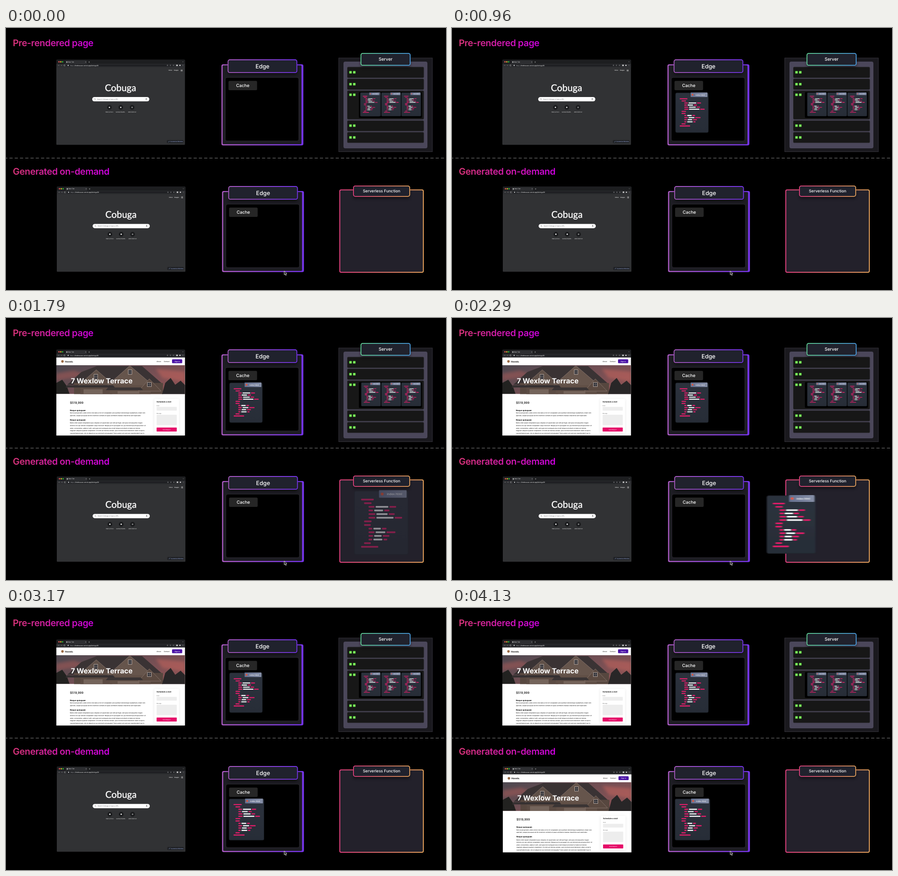
Recreate the animation shown at these times as an HTML page. Size 970x577 px, loop 4.18 s.

```html
<!DOCTYPE html>
<html lang="en">
<head>
<meta charset="utf-8">
<title>Pre-rendered and on-demand pages</title>
<style>
  html, body { margin: 0; width: 100%; height: 100%; overflow: hidden; background: #000; }
  svg { display: block; width: 970px; height: 577px; }
  text { font-family: Inter, Roboto, sans-serif; text-rendering: geometricPrecision; white-space: pre; }
  .logo { font-family: Lato, sans-serif; }
  .title { letter-spacing: -0.4px; }
</style>
</head>
<body>
<svg id="stage" viewBox="0 0 970 577"></svg>
<script>
const LOOP = 4180;
const stage = document.getElementById('stage');

const rect = (x, y, w, h, fill, rx = 0, more = '') =>
  `<rect x="${x}" y="${y}" width="${w}" height="${h}" fill="${fill}" rx="${rx}" ${more}/>`;
const circle = (x, y, r, fill, more = '') =>
  `<circle cx="${x}" cy="${y}" r="${r}" fill="${fill}" ${more}/>`;
const poly = (points, fill, more = '') => `<polygon points="${points}" fill="${fill}" ${more}/>`;
const path = (d, stroke, width = 0.6) =>
  `<path d="${d}" fill="none" stroke="${stroke}" stroke-width="${width}"/>`;
const text = (x, y, words, size, fill = '#fff', weight = 400, more = '') =>
  `<text x="${x}" y="${y}" font-size="${size}" fill="${fill}" font-weight="${weight}" ${more}>${words}</text>`;
const MID = 'text-anchor="middle"';
const shift = (x, y, content) => `<g transform="translate(${x} ${y})">${content}</g>`;

const gradient = (id, from, to, more = '') =>
  `<linearGradient id="${id}" ${more}><stop stop-color="${from}"/><stop offset="1" stop-color="${to}"/></linearGradient>`;

const defs = `<defs>
  ${gradient('title', '#d83478', '#c800dc')}
  ${gradient('purple', '#ac5bc4', '#7634ec')}
  ${gradient('mint', '#62d69a', '#4a9fe2')}
  ${gradient('sunset', '#e2417e', '#e6a25c')}
  ${gradient('sky', '#4d4850', '#8f5456', 'x2="1" y2="0.7"')}
  ${gradient('panel', '#2c323d', '#272d37', 'x2="0" y2="1"')}
  ${gradient('label', '#66708f', '#8790a8')}
  <filter id="soft" x="-20%" y="-20%" width="140%" height="150%"><feGaussianBlur stdDeviation="3"/></filter>
  <filter id="motion" x="-20%" y="-20%" width="140%" height="140%"><feGaussianBlur id="blur" stdDeviation="0 0"/></filter>
  <clipPath id="hero"><rect x="111" y="104" width="283.5" height="63.5"/></clipPath>
</defs>`;

// Each row: indent, then widths of a pink, a white and a pink bar
const CODE = [
  [9, 17], [13, 10], [19, 8, 17, 9], [19, 6, 12, 7], [19, 9, 15, 8], [19, 9, 23, 10], [13, 10],
  [13, 9], [19, 5, 10, 6], [19, 8, 13, 12], [19, 6, 10, 9], [19, 5, 12, 5], [13, 9], [9, 23]
];

function fileCard(height, firstRow, pitch) {
  const bars = CODE.map(([indent, ...widths], row) => {
    let x = indent;
    return widths.map((w, i) => {
      const bar = rect(x, firstRow + row * pitch - 1.2, w, 2.3, i === 1 ? '#f4f4f6' : '#e01e69', 0.9);
      x += w + 1.5;
      return bar;
    }).join('');
  }).join('');
  return rect(0, 0, 72, height, 'url(#panel)', 2.5, 'stroke="#20262e" stroke-width="1"') + bars +
    rect(33, -1, 37, 10, 'url(#label)', 0.8) + circle(37.3, 4, 1.9, '#e8583a') +
    text(43.5, 5.5, 'index.html', 4.1, '#fff', 500);
}

function browser() {
  const arrows = path('M118 82.3h-3m1.2-1.2-1.2 1.2 1.2 1.2M120.5 82.3h3m-1.2-1.2 1.2 1.2-1.2 1.2', '#85878b', 0.5);
  const icons = [356, 362.5, 369].map(x => circle(x, 82.3, 1, 'none', 'stroke="#b8babd" stroke-width=".5"')).join('');
  const shortcuts = [[228, 'Next.js Docs'], [253, 'Lumvex Dashb...'], [278, 'Add shortcut']].map(([x, name], i) =>
    circle(x, 174.8, 5.2, '#1b1c1e') +
    (i < 2 ? circle(x, 174.8, 1.4, '#fff') : path(`M${x - 1.7} 174.8h3.4m-1.7-1.7v3.4`, '#fff', 0.6)) +
    text(x, 186, name, 2.8, '#f1f1f1', 500, MID)).join('');
  const grid = [0, 1, 2].map(r => [0, 1, 2].map(c =>
    rect(385.4 + c * 1.3, 91.9 + r * 1.3, 0.9, 0.9, '#e4e4e4')).join('')).join('');
  return rect(111, 69.8, 283.5, 187.5, '#313234', 1.5) +
    rect(111, 69.8, 283.5, 10, '#1d1e20', 1.5) +
    rect(111, 79, 283.5, 8, '#2d2e31') +
    rect(131, 71.3, 47, 8, '#2d2e31', 1.5) +
    ['#ee5f57', '#f4bd30', '#2dc840'].map((c, i) => circle(116.8 + i * 4, 74.6, 1.5, c)).join('') +
    circle(134.2, 75, 1.3, '#d6d6d6') + text(137, 76.1, 'New Tab', 3.1, '#f2f2f2') +
    path('M174.8 74l1.8 1.8m0-1.8-1.8 1.8M181.8 75h3m-1.5-1.5v3M389 74l1 1 1-1', '#c8c9cb', 0.5) +
    arrows + path('M130.2 81.6a1.4 1.4 0 1 0 .1 1.3', '#d8d8d8', 0.6) +
    rect(133, 80.2, 239, 4.6, '#1f2023', 2.3) + circle(137, 82.4, 1.3, '#c6c8ca') +
    text(141, 83.6, '<tspan fill="#a5a7aa">https://</tspan>findhouses.vercel.app/listings/81', 3.25, '#fff', 500) +
    icons + rect(375.5, 80.8, 3, 3, '#ddd') + circle(383.5, 82.3, 1.3, '#f5f5f5') +
    circle(390, 81, 0.4, '#ccc') + circle(390, 82.3, 0.4, '#ccc') + circle(390, 83.6, 0.4, '#ccc') +
    text(358.5, 94.4, 'Inbox', 3, '#fff', 500) + text(370, 94.4, 'Images', 3, '#fff', 500) + grid +
    text(252.5, 138.6, 'Cobuga', 20.5, '#fff', 400, MID + ' class="logo" stroke="#fff" stroke-width=".4"') +
    rect(190, 152, 126, 9.6, '#fff', 4.8) +
    circle(196, 156.3, 1.2, 'none', 'stroke="#777" stroke-width=".5"') + path('M196.9 157.2l1.2 1.2', '#777', 0.5) +
    text(201, 158, 'Search Cobuga or type a URL', 3.3, '#5f6165') +
    rect(308.4, 154.4, 1.6, 3, '#666', 0.8) + path('M307.6 156.5q0 2 1.6 2t1.6-2m-1.6 2v1', '#666', 0.4) +
    shortcuts + rect(354.5, 246.8, 36.5, 6.8, '#202226', 1.5) +
    path('M358 251.6l2.6-2.6', '#9fb9ee', 0.7) + text(362.2, 251.4, 'Customize Window', 3, '#9fb0e8', 500);
}

function house() {
  const trim = 'stroke="#8d7a71" stroke-width=".8"';
  const pane = (x, y, w, h) => rect(x, y, w, h, '#33343a', 0, 'stroke="#b9aaa2" stroke-width="1"') +
    path(`M${x + w / 2} ${y}v${h}M${x} ${y + h / 2}h${w}`, '#a89a93', 0.4);
  return `<g clip-path="url(#hero)">` + rect(111, 104, 283.5, 63.5, 'url(#sky)') +
    `<g filter="url(#soft)" opacity=".6">` +
    poly('111,122 150,116 180,126 111,138', '#9c5654') + poly('330,112 395,118 395,140 345,132', '#bd625c') + '</g>' +
    poly('111,167 111,143 124,136 134,150 140,167', '#222220') +
    poly('135,147 166,119 200,106 300,106 347,147', '#3a3334') +
    rect(150, 143, 196, 25, '#57473f') +
    poly('160,148 199,114 238,148', '#5f5048', trim) + rect(164, 146, 70, 22, '#5b4b43') +
    poly('222,150 273,105 326,150', '#66554c', trim) + rect(229, 148, 90, 20, '#604f46') +
    poly('292,161 316,134 342,161', '#5a4940', trim) +
    poly('135,148 236,148 240,153 131,153', '#353031') +
    poly('225,153 297,153 302,159 220,159', '#3a3434') +
    pane(269.5, 114, 8, 10) + pane(194, 124, 8, 11) + pane(311.5, 142, 9, 9) +
    rect(171, 157, 42, 11, '#74645b') + rect(246, 161, 48, 7, '#74635a') +
    poly('344,168 351,143 363,132 373,147 385,138 395,148 395,168', '#282627') + '</g>';
}

const PARAGRAPHS = [
  [204.5, 210.2, [
    'Sed ut perspiciatis unde omnis iste natus error sit voluptatem accusantium doloremque laudantium, totam rem',
    'aperiam, eaque ipsa quae ab illo inventore veritatis et quasi architecto beatae vitae dicta sunt explicabo.']],
  [226, 232.4, [
    'Nemo enim ipsam voluptatem quia voluptas sit aspernatur aut odit aut fugit, sed quia consequuntur magni',
    'dolores eos qui ratione voluptatem sequi nesciunt. Neque porro quisquam est, qui dolorem ipsum quia dolor sit',
    'amet, consectetur, adipisci velit, sed quia non numquam eius modi tempora incidunt ut labore et dolore',
    'magnam aliquam quaerat voluptatem. Ut enim ad minima veniam, quis nostrum exercitationem ullam corporis',
    'suscipit laboriosam, nisi ut aliquid ex ea commodi consequatur? Quis autem vel eum iure reprehenderit qui in']]
];

function listing() {
  const copy = PARAGRAPHS.map(([headY, firstY, lines]) =>
    text(141, headY, 'Neque quisquam', 4.2, '#000', 700) +
    lines.map((line, i) => text(141, firstY + i * 5.55, line, 3.17, '#111', 500)).join('')).join('');
  return rect(111, 87, 283.5, 171.8, '#fff') +
    circle(124.5, 95.6, 2.8, '#9a6b45') + text(130, 97.6, 'Hovels.', 5.1, '#111', 700) +
    text(332, 96.6, 'About', 3.4, '#222', 500) + text(347.8, 96.6, 'Contact', 3.4, '#222', 500) +
    rect(366, 91, 22.5, 8.6, '#4b14a6', 1.6) + text(377.2, 96.6, 'Sign in', 3.4, '#fff', 500, MID) +
    house() + text(143, 144.3, '7 Wexlow Terrace', 15.7, '#fff', 700) +
    text(141, 188.8, '$519,999', 6.7, '#111', 500) + copy +
    rect(327, 179, 54.5, 75, '#bbb', 2, 'opacity=".35" filter="url(#soft)"') +
    rect(327, 178, 54.5, 75.5, '#fff', 2) + text(332, 186, 'Schedule a visit', 4.2, '#111', 700) +
    text(332, 194, 'Email', 2.4, '#444') + rect(332, 195.8, 44.5, 8.2, '#ededed', 0.8) +
    text(332, 211, 'Message', 2.4, '#444') + rect(332, 213, 44.5, 23, '#ededed', 0.8) +
    rect(332, 241.3, 44.5, 8.8, '#e50b67', 1) + text(354.2, 246.6, 'Send Request', 2.6, '#fff', 500, MID);
}

const header = (x, y, w, h, paint, title, size) =>
  rect(x, y + 5, w, h, '#000', 4, 'opacity=".45" filter="url(#soft)"') +
  rect(x, y, w, h, '#20222d', 4, `stroke="url(#${paint})" stroke-width="1.8"`) +
  text(x + w / 2, y + h / 2 + size * 0.35, title, size, '#fff', 500, MID);

const edge = () =>
  rect(475, 80, 180.5, 178.5, 'url(#purple)', 3.5) + rect(477.5, 82.3, 173.9, 173.7, '#1e1d24', 2) +
  rect(483.5, 109, 162, 139.8, '#000', 4, 'stroke="#2b2a30" stroke-width="1"') +
  header(489.5, 70, 151.8, 28.2, 'purple', 'Edge', 12.7) +
  rect(490.5, 116.5, 63, 20.4, '#262626', 2.5) + text(522, 130.1, 'Cache', 9.6, '#fff', 500, MID);

const SMALL = 0.592;
const topCard = fileCard(87, 13, 4.6);
const bottomCard = fileCard(85, 11.5, 4.87);

function server() {
  const bays = [[86, 23.5, 97.5], [112, 23.5, 123.7], [138, 63, 147], [204, 23, 215], [229.7, 23, 241]];
  const led = (x, y) => rect(x - 2.8, y - 2.8, 5.6, 5.6, '#68e648', 0.8) + rect(x - 0.8, y - 1, 1.6, 2, '#b5f79b');
  return rect(733.5, 66, 206.5, 206.5, '#1a191e', 0, 'stroke="#34333a" stroke-width="1"') +
    rect(744, 74, 185, 191, '#4b475a', 4) +
    bays.map(([y, h, ledY]) => rect(752.5, y, 168.5, h, '#171717', 2, 'stroke="#29292c" stroke-width="1"') +
      led(759.5, ledY) + led(767.8, ledY)).join('') +
    rect(778, 141, 139, 57, '#000', 2) +
    [783.3, 827.8, 872].map(x => shift(x, 142.5, `<g transform="scale(${SMALL})">${topCard}</g>`)).join('') +
    header(782.5, 55.8, 108.5, 26.4, 'mint', 'Server', 9.7);
}

const lambda = () =>
  rect(735.8, 356.5, 184.2, 181.5, '#23212b', 3, 'stroke="url(#sunset)" stroke-width="2"') +
  header(766, 347.8, 124, 23, 'sunset', 'Serverless Function', 8.7);

const title = (y, words) => text(15, y, words, 20.2, 'url(#title)', 600, 'class="title"');

stage.innerHTML = defs + rect(0, 0, 970, 577, '#000') +
  title(40.3, 'Pre-rendered page') + title(323.3, 'Generated on-demand') +
  '<path d="M0 286.5H970" stroke="#858585" stroke-width="1.2" stroke-dasharray="7 4.6" stroke-dashoffset="4"/>' +
  browser() + `<g id="topPage">${listing()}</g>` +
  shift(1, 279.4, browser() + `<g id="bottomPage">${listing()}</g>`) +
  edge() + shift(1.3, 279, edge()) + server() + lambda() +
  `<g id="topFile">${topCard}</g><g id="bottomFile">${bottomCard}</g>` +
  '<path d="M613.3 535v8.3l1.9-1.7 1.4 3.2 1.5-.7-1.4-3.1h2.5z" fill="#111" stroke="#fff" stroke-width=".8"/>';

const [topPage, bottomPage, topFile, bottomFile, blur] =
  ['topPage', 'bottomPage', 'topFile', 'bottomFile', 'blur'].map(id => document.getElementById(id));

const ramp = (t, start, length) => Math.min(1, Math.max(0, (t - start) / length));
const ease = u => u < 0.5 ? 2 * u * u : 1 - 2 * (1 - u) ** 2;
const mix = (a, b, p) => a + (b - a) * p;

// Moves a card between two [x, y, scale] places, blurred along x by its speed
function fly(node, t, start, length, from, to) {
  const u = ramp(t, start, length);
  const [x, y, s] = from.map((a, i) => mix(a, to[i], ease(u)));
  node.setAttribute('transform', `translate(${x} ${y}) scale(${s})`);
  const speed = 4 * Math.min(u, 1 - u) / length * Math.abs(to[0] - from[0]);
  if (speed > 0.03) {
    node.setAttribute('filter', 'url(#motion)');
    blur.setAttribute('stdDeviation', `${speed * 4 / s} 0.15`);
  } else {
    node.removeAttribute('filter');
  }
}

function draw(t) {
  fly(topFile, t, -48, 805, [783.3, 142.5, SMALL], [493, 143, 1]);
  fly(bottomFile, t, 1925, 1002, [768, 381, 1.645], [492, 420.7, 1.062]);
  bottomFile.setAttribute('opacity', ramp(t, 1700, 180));
  topPage.setAttribute('opacity', ramp(t, 1120, 400));
  bottomPage.setAttribute('opacity', ramp(t, 3390, 400));
}

const begin = performance.now();
function tick() {
  draw((performance.now() - begin) % LOOP);
  requestAnimationFrame(tick);
}
tick();
</script>
</body>
</html>
```
